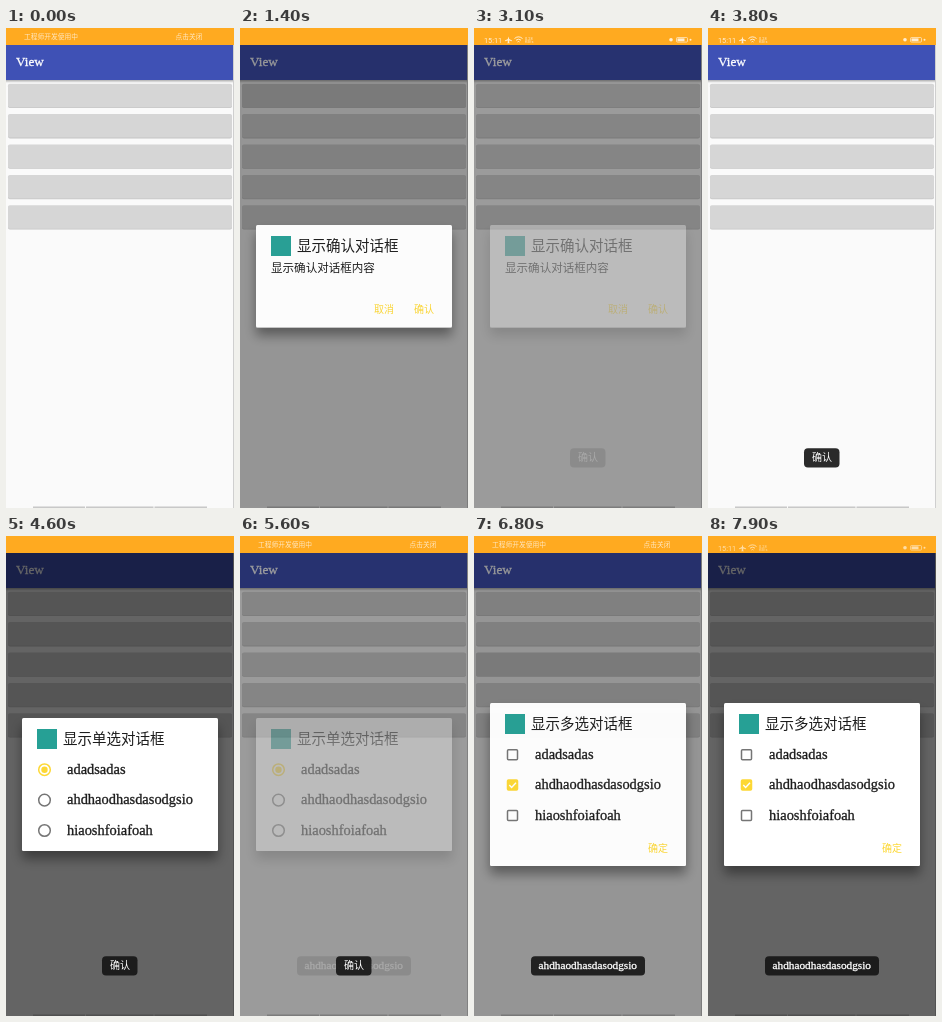
An HTML page for the animation above (8000 ms loop, 228 px wide and 480 px high).

```html
<!DOCTYPE html>
<html lang="zh-CN">
<head>
<meta charset="utf-8">
<title>View</title>
<style>
  html, body { margin: 0; width: 100%; height: 100%; overflow: hidden; background: #fafafa; }
  svg { display: block; }
  text { font-family: "Liberation Serif", "Noto Sans CJK SC", "Noto Sans CJK", serif; }
  .status text { font-family: Roboto, "Noto Sans CJK SC", "Noto Sans CJK", sans-serif; fill: #fff; }
  .latin { stroke-width: .3; }
  .action { fill: #fdd835; font-size: 10px; font-weight: 500; }
</style>
</head>
<body>
<svg id="stage" width="228" height="480" viewBox="0 0 228 480">
  <defs>
    <filter id="lift" x="-20%" y="-20%" width="140%" height="160%">
      <feDropShadow dx="0" dy="8" stdDeviation="6" flood-opacity=".4"/>
    </filter>
    <linearGradient id="edge" x2="0" y2="1">
      <stop stop-opacity=".3"/><stop offset="1" stop-opacity="0"/>
    </linearGradient>
    <clipPath id="buttonClip"></clipPath>
  </defs>
  <rect width="228" height="480" fill="#fafafa"/>
  <rect y="17" width="228" height="35" fill="#3f51b5"/>
  <rect y="52" width="228" height="3" fill="url(#edge)"/>
  <text class="latin" x="10" y="38" font-size="13.2" fill="#fff" stroke="#fff">View</text>
  <g id="buttons"></g>
  <g clip-path="url(#buttonClip)"><circle id="ripple"/></g>
  <path d="M27 479.300H79M80 479.300H147.500M148.500 479.300H201" stroke="#c8c8c8" stroke-width="1.400"/>
  <path d="M227.500 17V480" stroke="#cfcfcf"/>
  <rect id="dim" y="17" width="228" height="463"/>
  <g id="dialogs"></g>
  <g id="toasts"></g>
  <circle id="touch" r="7" fill="#fff" fill-opacity=".6" stroke="#c4c4c4"/>
  <rect width="228" height="17" fill="#ffaa20"/>
  <g class="status" id="notice" font-size="6.75">
    <text x="18" y="11" fill-opacity=".72">工程师开发使用中</text>
    <text x="169.500" y="11" fill-opacity=".72">点击关闭</text>
  </g>
  <g class="status" id="icons" fill="#fff" fill-opacity=".8">
    <text x="10" y="14.500" font-size="7.300">15:11</text>
    <path d="M34.500 8.500L35.200 11L38 12.500V13.200L35.200 12.500V14.500L36 15.300H33L33.800 14.500V12.500L31 13.200V12.500L33.800 11Z"/>
    <path d="M40.500 10.500Q44.500 7.200 48.500 10.500M42 12.200Q44.500 10.200 47 12.200M43.500 14Q44.500 13 45.500 14" fill="none" stroke="#fff" stroke-opacity=".8"/>
    <g font-size="3.900"><text x="51" y="11.500">0.28</text><text x="51" y="15">KB/s</text></g>
    <circle cx="197" cy="11.700" r="1.800"/>
    <rect x="202.500" y="9.500" width="11" height="4.600" rx="1" fill="none" stroke="#fff" stroke-opacity=".8" stroke-width=".7"/>
    <rect x="203.500" y="10.400" width="7" height="2.800"/>
    <circle cx="216.500" cy="11.800" r="1"/>
  </g>
</svg>
<script>
const LOOP = 8000;
const $ = id => document.getElementById(id);
const clamp = x => Math.max(0, Math.min(1, x));
const ramp = (t, start, length) => clamp((t - start) / length);
const set = (el, attrs) => { for (const k in attrs) el.setAttribute(k, attrs[k]); };
const add = (parent, markup) => {
  parent.insertAdjacentHTML('beforeend', markup);
  return parent.lastElementChild;
};

const buttonTop = i => 55.7 + i * 30.4;
for (let i = 0; i < 5; i++) {
  const box = (dy, fill) =>
    `<rect x="2" y="${buttonTop(i) + dy}" width="224" height="23.5" rx="1.8" fill="${fill}"/>`;
  add($('buttons'), box(.8, '#c6c6c6') + box(0, '#d6d6d6'));
}
const clipRect = add($('buttonClip'), '<rect x="2" width="224" height="23.5" rx="1.8"/>');

const plain = (x, y, size, text, color = '#1c1c1c') =>
  `<text x="${x}" y="${y}" font-size="${size}" fill="${color}">${text}</text>`;
const latin = (x, y, size, text, color = '#1c1c1c') =>
  `<text class="latin" x="${x}" y="${y}" font-size="${size}" fill="${color}" stroke="${color}">${text}</text>`;
const action = (x, y, text) => `<text class="action" x="${x}" y="${y}">${text}</text>`;
const radio = (y, on) =>
  `<circle cx="38.5" cy="${y}" r="5.8" fill="none" stroke="${on ? '#fdd835' : '#757575'}" stroke-width="1.5"/>` +
  (on ? `<circle cx="38.5" cy="${y}" r="3.2" fill="#fdd835"/>` : '');
const check = (y, on) =>
  `<rect x="33.5" y="${y - 5}" width="10" height="10" rx="1" fill="${on ? '#fdd835' : 'none'}" stroke="${on ? '#fdd835' : '#757575'}" stroke-width="1.5"/>` +
  (on ? `<path d="M35.3 ${y}l2.3 2.4l4.4-4.7" fill="none" stroke="#fff" stroke-width="1.4"/>` : '');

const items = ['adadsadas', 'ahdhaodhasdasodgsio', 'hiaoshfoiafoah'];
const choices = (top, mark, chosen) => items.map((text, i) => {
  const y = top + 51.7 + i * 30.4;
  return mark(y, i === chosen) + latin(61, y + 4, 14.45, text);
}).join('');

const dialog = (top, height, title, body, open, close) => ({
  open, close,
  el: add($('dialogs'), `<g><rect x="16" y="${top}" width="196" height="${height}" rx="1.5" fill="#fff" filter="url(#lift)"/>
    <rect x="31" y="${top + 11}" width="20" height="20" fill="#26a095"/>
    ${plain(57, top + 26, 14.5, title)}${body}</g>`)
});
const dialogs = [
  dialog(197, 102.5, '显示确认对话框',
    plain(31, 244.3, 11.55, '显示确认对话框内容') + action(134, 285, '取消') + action(174, 285, '确认'),
    1250, 3000),
  dialog(182, 133, '显示单选对话框', choices(182, radio, 0), 4250, 5500),
  dialog(167, 163, '显示多选对话框', choices(167, check, 1) + action(174, 315.5, '确定'), 6650, Infinity)
];

const toast = (x, width, caption, show, hide) => ({
  show, hide,
  el: add($('toasts'), `<g><rect x="${x}" y="420.2" width="${width}" height="19.3" rx="4" fill="#151515" fill-opacity=".9"/>
    ${caption}</g>`)
});
const toasts = [
  toast(57, 114, latin(64.5, 433.3, 11.3, items[1], '#fff'), 5570, Infinity),
  toast(96, 35.5, plain(104, 433.3, 10, '确认', '#fff'), 3070, 5620)
];

// Presses: time, x, y and, for list buttons, the button index.
const presses = [
  [1000, 100, 67, 0], [2880, 188.5, 290.5], [4000, 100, 98, 1],
  [5380, 100, 264], [6400, 104, 128, 2]
];

function drawStatus(t) {
  // Notice and icons swap every three seconds with a blank gap between.
  const turn = Math.floor((t + 1400) / 3000);
  const phase = t + 1400 - turn * 3000;
  const alpha = ramp(phase, 0, 400) * (1 - ramp(phase, 2200, 400));
  set($('notice'), { opacity: turn % 2 ? 0 : alpha });
  set($('icons'), { opacity: turn % 2 ? alpha : 0 });
}

function drawPresses(t) {
  const press = presses.find(([at]) => t >= at && t < at + 600);
  const age = press ? t - press[0] : 0;
  set($('touch'), { opacity: press && age < 180 ? 1 : 0 });
  set($('ripple'), { opacity: 0 });
  if (!press) return;
  const [, x, y, index] = press;
  set($('touch'), { cx: x, cy: y });
  if (index === undefined) return;
  set(clipRect, { y: buttonTop(index) });
  set($('ripple'), { cx: x, cy: y, r: 12 + age * .3, opacity: .14 * (1 - age / 600) });
}

function draw(t) {
  let dim = 0;
  for (const d of dialogs) {
    const alpha = ramp(t, d.open, 155) * (1 - ramp(t, d.close, 150));
    set(d.el, { opacity: alpha, visibility: alpha ? 'visible' : 'hidden' });
    dim = Math.max(dim, .6 * ramp(t, d.open, 225) * (1 - ramp(t, d.close, 275)));
  }
  set($('dim'), { opacity: dim });
  for (const s of toasts)
    set(s.el, { opacity: ramp(t, s.show, 250) * (1 - ramp(t, s.hide, 250)) });
  drawPresses(t);
  drawStatus(t);
}

const start = performance.now();
function frame() {
  draw((performance.now() - start) % LOOP);
  requestAnimationFrame(frame);
}
frame();
</script>
</body>
</html>
```
